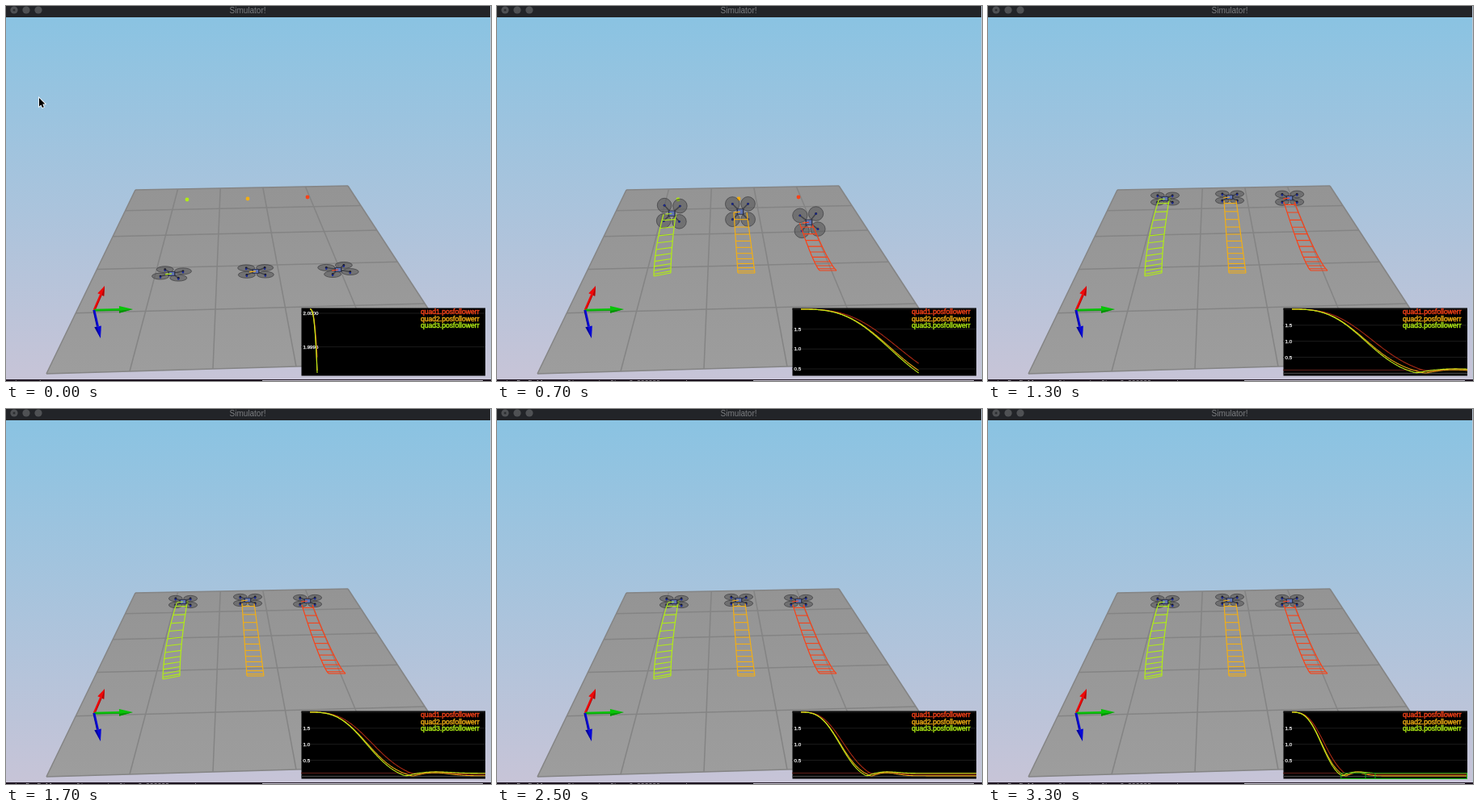
Animation of 600x465 px, one loop 3.4 s. Source, as an HTML page with a canvas:

```html
<!DOCTYPE html>
<html lang="en">
<head>
<meta charset="utf-8">
<title>Simulator!</title>
<style>
  html, body { margin: 0; width: 100%; height: 100%; overflow: hidden; background: #222428; }
  canvas { display: block; }
</style>
</head>
<body>
<canvas id="stage" width="600" height="465"></canvas>
<script>
const ctx = document.getElementById('stage').getContext('2d');
const STEP = 100, LOOP = 3400;
const SANS = '"Liberation Sans", Arial, sans-serif';
const MONO = '"Liberation Mono", monospace';
const mix = (a, b, t) => a + (b - a) * t;
const mixPoint = (a, b, t) => [mix(a[0], b[0], t), mix(a[1], b[1], t)];

function path(pts, close) {
  ctx.beginPath();
  pts.forEach(([x, y], i) => i ? ctx.lineTo(x, y) : ctx.moveTo(x, y));
  if (close) ctx.closePath();
}
function line(pts, color, width = 1) {
  path(pts);
  ctx.strokeStyle = color;
  ctx.lineWidth = width;
  ctx.stroke();
}
function fill(pts, color) {
  path(pts, true);
  ctx.fillStyle = color;
  ctx.fill();
}
function rect(x, y, w, h, color) {
  ctx.fillStyle = color;
  ctx.fillRect(x, y, w, h);
}
function disc(x, y, rx, ry, color) {
  ctx.beginPath();
  ctx.ellipse(x, y, rx, ry, 0, 0, 7);
  ctx.fillStyle = color;
  ctx.fill();
}
const dot = (x, y, r, color) => disc(x, y, r, r, color);
function text(str, x, y, size, color, { align = 'left', family = SANS, weight = 0 } = {}) {
  ctx.font = size + 'px ' + family;
  ctx.textAlign = align;
  ctx.fillStyle = ctx.strokeStyle = color;
  ctx.fillText(str, x, y);
  if (weight) {
    ctx.lineWidth = weight;
    ctx.strokeText(str, x, y);
  }
}
function shade(y0, y1, c0, c1) {
  const g = ctx.createLinearGradient(0, y0, 0, y1);
  g.addColorStop(0, c0);
  g.addColorStop(1, c1);
  return g;
}
function clipped(x, y, w, h, paint) {
  ctx.save();
  ctx.beginPath();
  ctx.rect(x, y, w, h);
  ctx.clip();
  paint();
  ctx.restore();
}

function drawWindow(n) {
  rect(0, 0, 600, 465, '#222428');
  rect(0, 14, 599, 449, shade(14, 463, '#8ac3e2', '#c7c4d7'));
  rect(599, 0, 1, 463, '#bcc8d6');
  for (let x = 10; x <= 40; x += 15) dot(x, 5, 4.6, '#4f5154');
  dot(10, 5, 1.5, '#2c2e31');
  text('Simulator!', 299, 9, 10, '#7c7e81', { align: 'center' });

  rect(0, 463, 600, 2, '#1d1420');
  rect(317, 464, 273, 1, '#c9c6d2');
  const log = n ? 'sim PosFollow config reset after 0.000000 seconds' : 'sim ready';
  clipped(0, 463, 317, 2, () => text(log, 5, 469, 8, '#c9c4cc', { family: MONO }));
}

// Ground: a 5 by 5 grid in perspective
function drawFloor() {
  const tl = [160, 228], tr = [423, 223], br = [565, 441], bl = [50, 456];
  fill([tl, tr, br, bl], shade(224, 456, '#949494', '#9d9d9d'));
  for (let v = 0; v <= 1; v += 0.2) {
    const far = v / (v + 1.97 * (1 - v));
    line([mixPoint(tl, tr, v), mixPoint(bl, br, v)], '#848484', 1.5);
    line([mixPoint(tl, bl, far), mixPoint(tr, br, far)], '#848484', 1.5);
  }
}

function arrow(dx, dy, head, color, dark) {
  const len = Math.hypot(dx, dy);
  ctx.save();
  ctx.translate(109, 377);
  ctx.rotate(Math.atan2(dy, dx));
  line([[0, 0], [len - head, 0]], color, 2.6);
  line([[0, 1.2], [len - head, 1.2]], dark, 0.8);
  fill([[len, 0], [len - head, -4.3], [len - head, 4.3]], color);
  fill([[len, 0], [len - head, 1.5], [len - head, 4.3]], dark);
  ctx.restore();
}

// Each craft settles along s(u) = 1 - exp(-(u / time)^POWER), u in plot pixels
const POWER = 2.9, START = 2.00006;
const clock = n => 9 + 19.52 * n;
const remain = (q, u) => Math.exp(-Math.pow(u / q.time, POWER));
function accel(q, u) {
  const x = u / q.time, f = Math.pow(x, POWER);
  return Math.pow(x, POWER - 2) * Math.exp(-f) * (POWER - 1 - POWER * f);
}
function error(q, u) {
  const w = remain(q, u);
  const bounce = (q.rest + q.peak * Math.exp(-(((u - 240) / 45) ** 2))) * (1 - w);
  return Math.hypot(START * w - bounce, q.floor * (1 - w));
}

const quads = [
  {
    name: 'quad1.posfollowerr', color: '#f84218', trace: '#a82814',
    time: 139, rest: 0, peak: 0.14, floor: 0.06, depth: 1.1, yaw: 0.35,
    from: [411, 327], to: [373, 238], target: [373, 237],
    feet: [[399, 328], [420, 328]], heads: [[366, 243], [379, 243]], bend: 0.8
  },
  {
    name: 'quad2.posfollowerr', color: '#f2ae14', trace: '#e8a414',
    time: 128, rest: 0.01, peak: 0.1, floor: 0.01, depth: 0.8, yaw: 0.03,
    from: [309, 329], to: [299, 237], target: [299, 239],
    feet: [[298, 331], [319, 331]], heads: [[292, 241], [307, 241]], bend: 1
  },
  {
    name: 'quad3.posfollowerr', color: '#b0ec14', trace: '#c0ee18',
    time: 128, rest: 0.09, peak: 0.05, floor: 0.02, depth: 0.8, yaw: -0.25,
    from: [205, 332], to: [219, 239], target: [224, 240],
    feet: [[194, 335], [215, 331]], heads: [[211, 241], [224, 241]], bend: 1.7
  }
];

// Ribbon ladder left behind a craft, visible below its height
function drawTrail(q, top) {
  const at = (side, f) => [
    mix(q.feet[side][0], q.heads[side][0], Math.pow(f, q.bend)),
    mix(q.feet[side][1], q.heads[side][1], f)
  ];
  clipped(0, top, 600, 465, () => {
    for (const side of [0, 1])
      line(Array.from({ length: 31 }, (_, i) => at(side, i / 30)), q.color, 1.2);
    for (let i = 0; i <= 12; i++) {
      const f = 0.96 * Math.pow(i / 12, 1.45);
      line([at(0, f), at(1, f)], q.color, 1.1);
    }
  });
}

// Speeding up tips the rotors edge-on; braking turns them to the viewer
function drawQuad(q, n) {
  const u = clock(n), w = remain(q, u), a = accel(q, u);
  const f = (1 - w) / (1 - w + q.depth * w);
  const [x, y] = mixPoint(q.from, q.to, f);
  const view = Math.sin(Math.min(Math.PI / 2, 0.45 - a * (a > 0 ? 0.38 : 1.8)));
  const size = mix(1.25, 1, f), r = 8.4 * size, ry = r * view, drop = 2.2 * (1 - view);

  const hubs = [0, 1, 2, 3].map(k => {
    const turn = Math.PI * (k + 0.5) / 2 + q.yaw * (1 - f);
    return [x + 13 * size * Math.cos(turn), y - 13 * size * view * Math.sin(turn)];
  });
  for (const k of [0, 1]) line([hubs[k], hubs[k + 2]], '#3c3e46', 1.5);
  hubs.forEach(([hx, hy]) => {
    disc(hx, hy, r, ry, 'rgba(74,74,76,.48)');
    ctx.strokeStyle = 'rgba(62,62,64,.8)';
    ctx.lineWidth = 0.9;
    ctx.stroke();
    dot(hx, hy, 1.4, '#191a26');
    dot(hx, hy + drop, 1.2, '#1c2a98');
  });
  if (n) drawTrail(q, y + 1);

  const h = 5 + 2.5 * view;
  rect(x - 4.5, y - h / 2, 9, h, '#30354c');
  rect(x - 3, y - h / 2 + 1, 6, h - 2, '#6074b4');
  line([[x - 8, y + 1], [x, y]], q.color, 1.2);
}

// Graph panel with automatic scale
const LEFT = 376, TOP = 376, HIGH = 79, WIDE = 217;
function tickStep(range) {
  let s = 1e-5, k = 0;
  while (range / s > 6) s *= k++ % 2 ? 2 : 5;
  return s;
}
function drawPlot(n) {
  const total = clock(n), sx = Math.min(1, WIDE / total);
  const count = Math.ceil(total * sx);
  const traces = quads.map(q => Array.from({ length: count + 1 }, (_, i) => {
    const u = i / count * total;
    return [LEFT + u * sx, error(q, u)];
  }));
  const low = Math.min(...traces.flat().map(p => p[1])), range = START - low;
  const py = e => TOP + (START - e) / range * HIGH;
  const level = (y, color, x = 365) => line([[x, y], [593, y]], color);

  rect(365.5, 374.5, 227.5, 84, '#000');
  const step = tickStep(range), digits = Math.max(1, Math.ceil(-Math.log10(step) - 1e-6));
  for (let k = Math.floor(START / step + 1e-6); k >= 0; k--) {
    const y = py(k * step);
    if (y > 458) break;
    level(y, k ? '#1c1c1c' : '#505050');
    if (y > 379 && y < 454)
      text((k * step).toFixed(digits), 367.5, y + 2, 6.2, '#f0f0f0', { weight: 0.25 });
  }
  if (low < 0.1) level(py(0.1), '#64201c');

  quads.forEach((q, i) => {
    line(traces[i].map(([x, e]) => [x, py(e)]), q.trace, 1.1);
    text(q.name, 585.5, 382 + i * 8.6, 8.6, q.color, { align: 'right', weight: 0.4 });
  });

  if (n >= 29) {
    const marks = [183, 274, 310].map(u => LEFT + u * sx), y = py(0.1);
    level(y, '#1c8a1c', marks[0]);
    level(458.4, '#18c818', marks[0]);
    [...marks, 592.5].forEach(x => line([[x, y], [x, 459]], '#18b018'));
  }
}

function drawCursor(x, y) {
  const shape = [[0, 0], [0, 10.5], [2.4, 8.4], [4, 12], [5.8, 11.2], [4.3, 7.6], [7.4, 7.4]]
    .map(([a, b]) => [x + a, y + b]);
  path(shape, true);
  ctx.strokeStyle = '#fff';
  ctx.lineWidth = 1.6;
  ctx.stroke();
  fill(shape, '#000');
}

function draw(n) {
  drawWindow(n);
  drawFloor();
  arrow(13, -30, 12, '#f00808', '#b00505');
  arrow(48, -1, 17, '#08c408', '#059005');
  arrow(8, 35, 15, '#0707d8', '#04049a');
  quads.forEach(q => dot(...q.target, 2.4, q.color));
  quads.forEach(q => drawQuad(q, n));
  drawPlot(n);
  if (n === 0) drawCursor(41, 114);
}

function tick() {
  draw(Math.floor(performance.now() % LOOP / STEP));
  requestAnimationFrame(tick);
}
tick();
</script>
</body>
</html>
```
